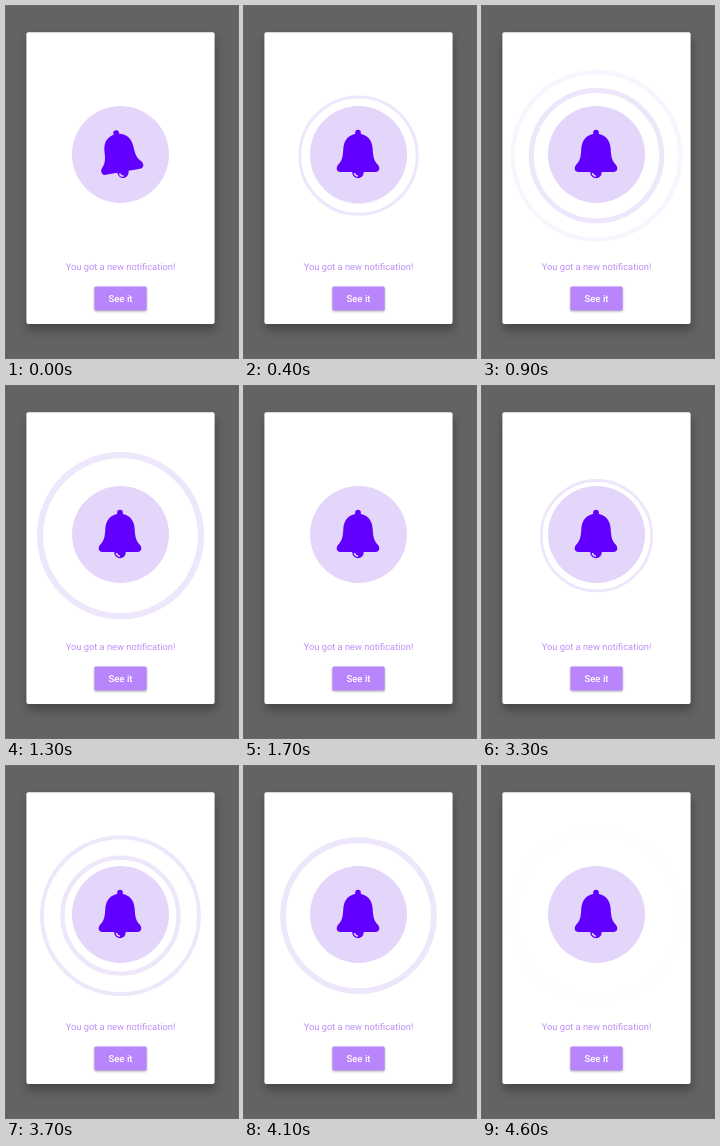
Recreate the animation shown at these times as an HTML page. Size 232 px wide and 352 px high, loop 4900 ms.

```html
<!DOCTYPE html>
<html lang="en">
<head>
<meta charset="utf-8">
<title>Notification</title>
<style>
  html, body { margin: 0; width: 100%; height: 100%; overflow: hidden; background: #636363; }
  svg { display: block; }
  .card { fill: #fff; filter: drop-shadow(1px 6px 5px rgba(0, 0, 0, .3)); }
  .button { fill: #b985fc; filter: drop-shadow(0 1px 1px rgba(0, 0, 0, .3)); }
  .ring { fill: none; stroke: #eee7fc; }
  text { font-family: Roboto, sans-serif; text-anchor: middle; text-rendering: geometricPrecision; }
  .message { font-size: 9.3px; fill: #bd8ff8; }
  .label { font-size: 9.6px; font-weight: 500; fill: #fff; }
</style>
</head>
<body>
<svg width="232" height="352" viewBox="0 0 232 352">
  <rect class="card" x="20.4" y="26.3" width="188.2" height="291.700" rx="2"/>
  <rect class="button" x="88.400" y="280.600" width="52.300" height="23.800" rx="1.500"/>
  <circle class="ring" id="thin" cx="114.5" cy="149.7"/>
  <circle class="ring" id="thick" cx="114.5" cy="149.7"/>
  <circle cx="114.5" cy="148.5" r="48.5" fill="#e4d5fb"/>
  <g id="bell" fill="#6200ff">
    <circle cx="114" cy="126.7" r="2.9"/>
    <path d="M114 127.700C105 127.700 99.800 134 99.300 143C99 151 97.800 155 94.300 158.500C91.500 161.500 92.500 166 96.500 166H131.500C135.500 166 136.500 161.500 133.700 158.500C130.200 155 129 151 128.700 143C128.200 134 123 127.700 114 127.700Z"/>
    <circle cx="114" cy="166.500" r="5.700"/>
    <path d="M110.500 167A3.600 3.600 0 0 0 114 170.200" fill="none" stroke="#e4d5fb" stroke-width="1.500"/>
  </g>
  <text class="message" x="114.5" y="264">You got a new notification!</text>
  <text class="label" x="114.5" y="296">See it</text>
</svg>
<script>
  const LOOP = 4900, LAST = 4600, STEP = 100;
  const PERIOD = 2960, SWING = 540, LEAD = 260;
  const INNER = 46, OUTER = 87;

  const rings = [
    { id: 'thin', weight: .05, grow: [0, 1000], fade: [760, 1000] },
    { id: 'thick', weight: .074, grow: [200, 1550], fade: [1300, 1670] }
  ];
  const $ = id => document.getElementById(id);
  const progress = (t, [from, to]) => Math.min(1, Math.max(0, (t - from) / (to - from)));
  const easeInOut = u => (1 - Math.cos(Math.PI * u)) / 2;

  function draw(now) {
    const t = Math.min(Math.floor(now % LOOP / STEP) * STEP, LAST);
    // The bell starts to swing shortly before each pulse, at negative pulse times.
    const pulse = t < PERIOD - LEAD ? t : t - PERIOD;

    for (const { id, weight, grow, fade } of rings) {
      const radius = INNER + (OUTER - INNER) * easeInOut(progress(pulse, grow));
      const ring = $(id);
      ring.setAttribute('r', radius * (1 - weight / 2));
      ring.setAttribute('stroke-width', radius * weight);
      ring.setAttribute('opacity', 1 - progress(pulse, fade));
    }

    const angle = 10 * Math.sin(3 * Math.PI * progress(pulse, [-LEAD, SWING - LEAD]));
    $('bell').setAttribute('transform', `rotate(${angle} 114.5 149)`);
  }

  const start = performance.now();
  function tick() {
    draw(performance.now() - start);
    requestAnimationFrame(tick);
  }
  tick();
</script>
</body>
</html>
```
